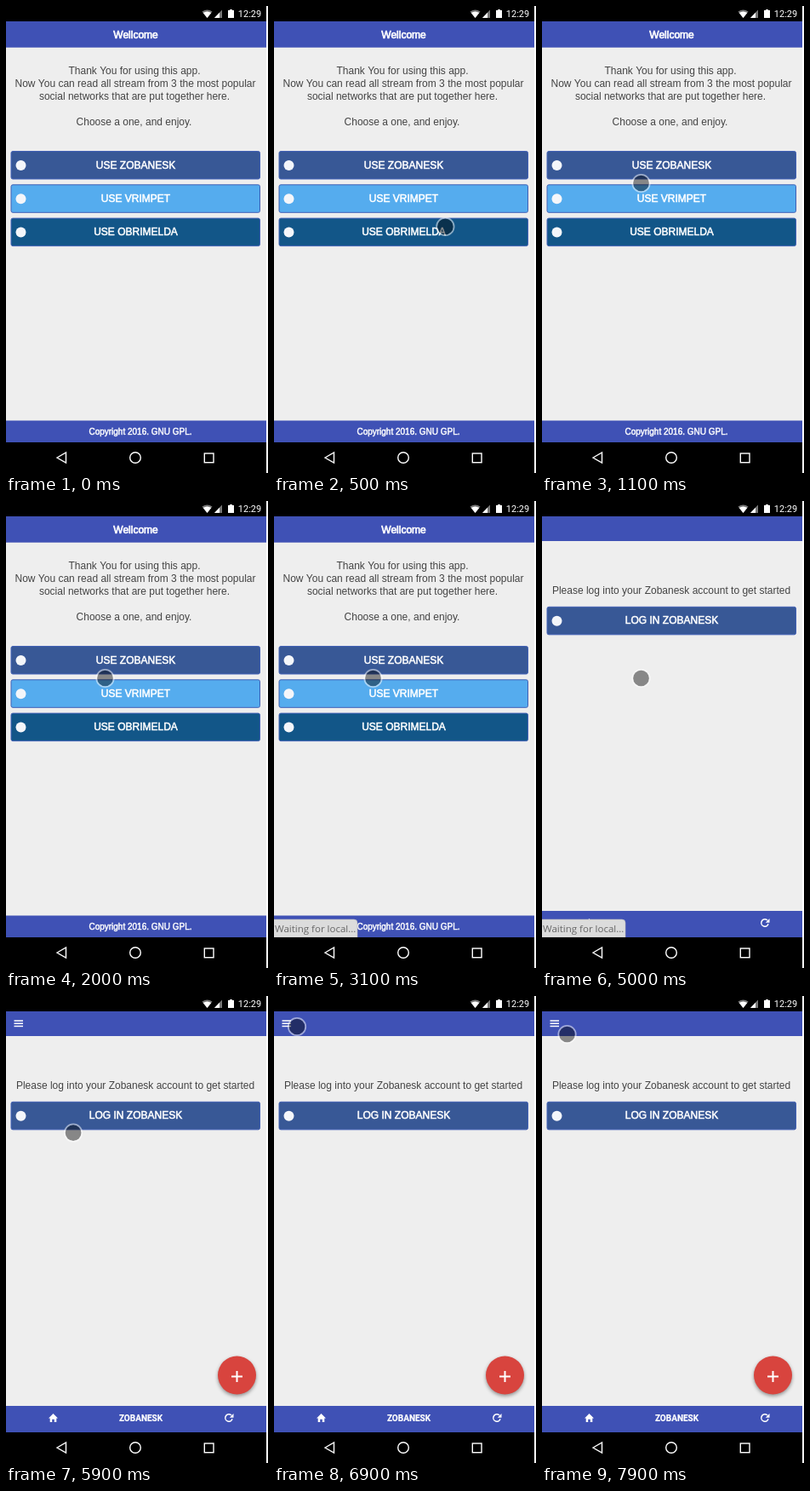
An HTML page with a canvas for the animation above (8000 ms loop, 308x548 px).

```html
<!DOCTYPE html>
<html lang="en">
<head>
<meta charset="utf-8">
<title>Social stream app</title>
<style>
html, body { margin: 0; width: 100%; height: 100%; overflow: hidden; background: #fff; }
canvas { display: block; width: 308px; height: 548px; }
</style>
</head>
<body>
<canvas id="stage"></canvas>
<script>
const W = 308, H = 548, APP = 306, LOOP = 8000, STEP = 100;
const LOADING = 3100, LOGIN = 5000, READY = 5200;
const SANS = '"Liberation Sans", Arial, sans-serif';
const ROBOTO = 'Roboto, sans-serif';
const INDIGO = '#3f51b5', PAPER = '#eee', INK = '#444', EDGE = '#4160b5';

const canvas = document.getElementById('stage');
const ctx = canvas.getContext('2d');
const ratio = window.devicePixelRatio || 1;
canvas.width = W * ratio;
canvas.height = H * ratio;

// Pointer stops: time, x, y
const path = [
  [0, 320, 330], [900, 116.5, 208], [5500, 116.5, 208], [6100, 66, 144],
  [6300, 66, 144], [6900, 27, 36], [7200, 27, 36], [7900, 29.5, 45], [LOOP, 29.5, 45]
];

function rect(x, y, w, h, color) {
  ctx.fillStyle = color;
  ctx.fillRect(x, y, w, h);
}

function disc(x, y, r, color) {
  ctx.fillStyle = color;
  ctx.beginPath();
  ctx.arc(x, y, r, 0, Math.PI * 2);
  ctx.fill();
}

function poly(points, color) {
  ctx.fillStyle = color;
  ctx.beginPath();
  points.forEach(([x, y]) => ctx.lineTo(x, y));
  ctx.closePath();
  ctx.fill();
}

function text(str, x, y, font, color, weight = 0, align = 'center') {
  ctx.font = font;
  ctx.textAlign = align;
  ctx.fillStyle = color;
  ctx.fillText(str, x, y);
  if (weight) {
    ctx.strokeStyle = color;
    ctx.lineWidth = weight;
    ctx.strokeText(str, x, y);
  }
}

function button(y, label, fill) {
  ctx.beginPath();
  ctx.roundRect(6, y + 0.5, 292.5, 32.5, 2);
  ctx.fillStyle = fill;
  ctx.fill();
  ctx.strokeStyle = EDGE;
  ctx.lineWidth = 1;
  ctx.stroke();
  disc(17.5, y + 17, 6, '#f4f6fa');
  text(label, 152.5, Math.round(y + 20.6), `12px ${SANS}`, '#fff', 0.55);
}

// Wifi fan standing on its tip
function fan(size, color) {
  ctx.fillStyle = color;
  ctx.beginPath();
  ctx.moveTo(236.5, 14);
  ctx.lineTo(236.5 - 6 * size, 14 - 7.5 * size);
  ctx.quadraticCurveTo(236.5, 14 - 11.5 * size, 236.5 + 6 * size, 14 - 7.5 * size);
  ctx.fill();
}

function systemBars() {
  rect(0, 0, APP, 18, '#000');
  rect(0, 512, APP, 36, '#000');

  fan(1, '#777');
  fan(0.8, '#fff');
  poly([[245, 14], [254, 14], [254, 4.5]], '#777');
  poly([[245, 14], [251, 14], [251, 7.7]], '#fff');
  rect(261, 5, 7, 9, '#fff');
  rect(263, 4, 3, 1, '#fff');
  text('12:29', 286.5, 13, `11px ${ROBOTO}`, '#fff');

  ctx.strokeStyle = '#fff';
  ctx.lineWidth = 1.4;
  ctx.beginPath();
  ctx.moveTo(60, 530);
  ctx.lineTo(70.5, 524);
  ctx.lineTo(70.5, 536);
  ctx.closePath();
  ctx.stroke();
  ctx.beginPath();
  ctx.arc(152, 530, 6.3, 0, Math.PI * 2);
  ctx.stroke();
  ctx.strokeRect(233.3, 525, 10.7, 10.7);
}

function frame(headerEnd, footerTop) {
  rect(0, 18, APP, 494, PAPER);
  rect(0, 18, APP, headerEnd - 18, INDIGO);
  rect(0, footerTop, APP, 512 - footerTop, INDIGO);
}

function welcomePage() {
  frame(48.7, 486.5);
  text('Wellcome', 152.5, 38, `12px ${SANS}`, '#fff', 0.7);
  const lines = [
    ['Thank You for using this app.', 151, 80],
    ['Now You can read all stream from 3 the most popular', 152, 95],
    ['social networks that are put together here.', 151, 110],
    ['Choose a one, and enjoy.', 150.5, 140]
  ];
  lines.forEach(([str, x, y]) => text(str, x, y, `12px ${SANS}`, INK));
  button(170, 'USE ZOBANESK', '#385896');
  button(209.3, 'USE VRIMPET', '#55acee');
  button(248.6, 'USE OBRIMELDA', '#125688');
  text('Copyright 2016. GNU GPL.', 158, 503, `10px ${SANS}`, '#fff', 0.45);
}

function homeIcon() {
  poly([[50, 495.5], [55.5, 490], [61, 495.5], [59.3, 495.5], [59.3, 500],
    [56.8, 500], [56.8, 496.8], [54.2, 496.8], [54.2, 500], [51.7, 500], [51.7, 495.5]], '#fff');
}

function refreshIcon() {
  ctx.strokeStyle = '#fff';
  ctx.lineWidth = 1.5;
  ctx.beginPath();
  ctx.arc(262, 495, 4.2, 0.3, Math.PI * 1.75);
  ctx.stroke();
  poly([[267.5, 490], [267.5, 494.7], [262.8, 494.7]], '#fff');
}

function addButton() {
  ctx.save();
  ctx.translate(271.5, 445);
  ctx.shadowColor = 'rgba(0,0,0,.4)';
  ctx.shadowBlur = 4 * ratio;
  ctx.shadowOffsetY = 2 * ratio;
  disc(0, 0, 22.5, '#d8443e');
  ctx.shadowColor = 'transparent';
  rect(-6.5, 0.5, 13, 2, '#fff');
  rect(-1, -5, 2, 13, '#fff');
  ctx.restore();
}

function loginPage(ready) {
  frame(47, 481);
  text('Please log into your Zobanesk account to get started', 152, 109, `12px ${SANS}`, INK);
  button(123.8, 'LOG IN ZOBANESK', '#385896');
  homeIcon();
  refreshIcon();
  if (!ready) return;
  [28.3, 31.5, 34.7].forEach(y => rect(9.5, y, 10.5, 1.5, '#fff'));
  text('ZOBANESK', 158.5, 498.5, `bold 10px ${ROBOTO}`, '#fff', 0.2);
  addButton();
}

function statusBubble() {
  ctx.beginPath();
  ctx.roundRect(-1, 491, 99, 21, [0, 4, 0, 0]);
  ctx.fillStyle = '#dcdcdc';
  ctx.fill();
  ctx.strokeStyle = '#bbb';
  ctx.lineWidth = 0.6;
  ctx.stroke();
  text('Waiting for local...', 1, 506, '11.5px "Open Sans", sans-serif', '#666', 0, 'left');
}

function pointer(t) {
  const i = path.findIndex(stop => t < stop[0]);
  const [t0, x0, y0] = path[i - 1], [t1, x1, y1] = path[i];
  const k = (t - t0) / (t1 - t0);
  const ease = k * k * (3 - 2 * k);
  const x = x0 + (x1 - x0) * ease, y = y0 + (y1 - y0) * ease;
  disc(x, y, 9.5, 'rgba(0,0,0,.43)');
  ctx.strokeStyle = 'rgba(255,255,255,.5)';
  ctx.lineWidth = 1.8;
  ctx.beginPath();
  ctx.arc(x, y, 10.2, 0, Math.PI * 2);
  ctx.stroke();
}

function draw(t) {
  ctx.setTransform(ratio, 0, 0, ratio, 0, 0);
  rect(0, 0, W, H, '#fff');
  if (t < LOGIN) welcomePage();
  else loginPage(t >= READY);
  if (t >= LOADING && t < READY) statusBubble();
  pointer(t);
  systemBars();
  rect(APP, 0, W - APP, H, '#fff');
}

const start = performance.now();
function tick() {
  const t = (performance.now() - start) % LOOP;
  draw(Math.floor(t / STEP) * STEP);
  requestAnimationFrame(tick);
}
tick();
</script>
</body>
</html>
```
